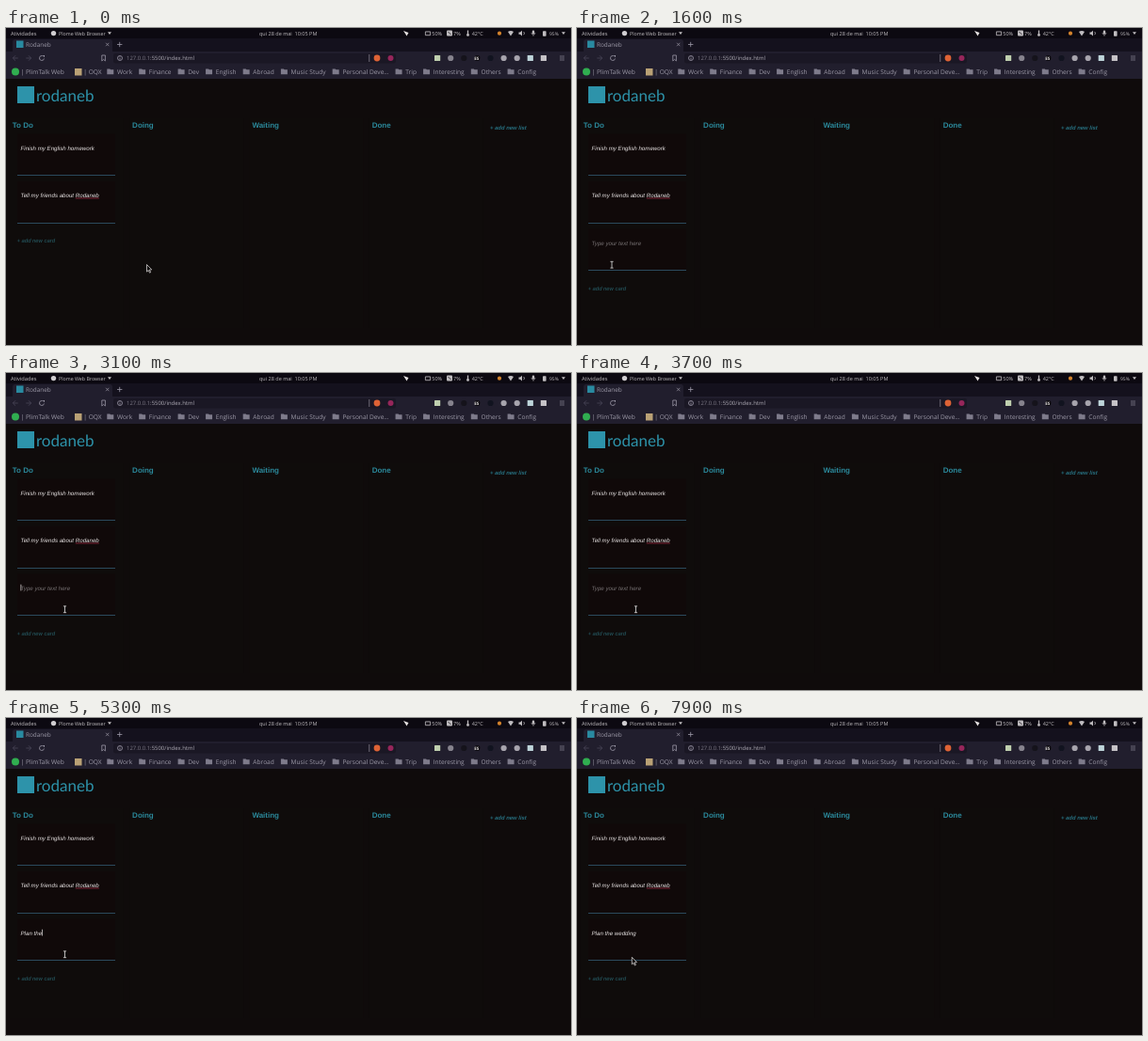
Animation, 600 px wide and 337 px high, one loop 8000 ms. Source, as an HTML page with a canvas:

```html
<!DOCTYPE html>
<html lang="en">
<head>
<meta charset="utf-8">
<title>Task board</title>
<style>
html, body { margin: 0; width: 100%; height: 100%; overflow: hidden; background: #0f0b0b; }
canvas { display: block; width: 600px; height: 337px; }
</style>
</head>
<body>
<canvas id="stage" width="600" height="337"></canvas>
<script>
const LOOP = 8000, TICK = 100, BLINK = 600;
const ADD_CARD = 1400, FOCUS = 3000, LEAVE_CARD = 7800;
const UI = '"Open Sans", "Noto Sans", sans-serif';
const PAGE = '"Liberation Sans", Arial, sans-serif';
const APP = 'Rodaneb';
const TEAL = '#2b899b', WHITE = '#e6e2e2', INK = '#9c99a7', PANEL_INK = '#c0bdc0';

const ctx = document.getElementById('stage').getContext('2d');
ctx.textRendering = 'geometricPrecision';

function rect(x, y, w, h, color, radius = 0) {
  ctx.fillStyle = color;
  ctx.beginPath();
  ctx.roundRect(x, y, w, h, radius);
  ctx.fill();
}

function dot(x, y, r, color) {
  rect(x - r, y - r, 2 * r, 2 * r, color, r);
}

function ring(x, y, r, color, from = 0, to = Math.PI * 2) {
  ctx.strokeStyle = color;
  ctx.lineWidth = 0.8;
  ctx.beginPath();
  ctx.arc(x, y, r, from, to);
  ctx.stroke();
}

// Draws SVG path data with its origin at x, y.
function path(x, y, data, stroke, width = 0.8, fill) {
  const outline = new Path2D(data);
  ctx.save();
  ctx.translate(x, y);
  if (fill) {
    ctx.fillStyle = fill;
    ctx.fill(outline);
  }
  if (stroke) {
    ctx.strokeStyle = stroke;
    ctx.lineWidth = width;
    ctx.stroke(outline);
  }
  ctx.restore();
}

const solid = (x, y, data, color) => path(x, y, data, null, 0, color);

function textWidth(str, size, family = UI, style = '') {
  ctx.font = `${style} ${size}px ${family}`;
  return ctx.measureText(str).width;
}

function label(str, x, y, size, color, family = UI, style = '') {
  const width = textWidth(str, size, family, style);
  ctx.fillStyle = color;
  ctx.fillText(str, x, y);
  return width;
}

const italic = (str, x, y, color, size = 6.17, weight = '') =>
  label(str, x, y, size, color, PAGE, `italic ${weight}`);

function drawPanel() {
  const text = (str, x, size = 5.5) => label(str, x, 7.7, size, PANEL_INK);
  const caretDown = x => solid(x, 4.3, 'M0 0h4l-2 2.7z', PANEL_INK);
  rect(0, 0, 600, 11, '#0c0911');

  text('Atividades', 5, 5.7);
  dot(50.5, 5.6, 2.7, '#d0cdd0');
  text('Plome Web Browser', 56, 5.3);
  caretDown(108);
  text('qui 28 de mai  10:05 PM', 269);

  solid(422, 3, 'M0 0l5.5 2-2 3.5-1.5-2.5z', WHITE);
  rect(445.4, 3.9, 5.2, 3.8, '#17131b', 1);
  path(445.4, 3.9, 'M0 0h5.2v3.8h-5.2z', PANEL_INK);
  text('50%', 452.3);
  rect(468, 2.5, 6, 6, PANEL_INK, 1);
  path(469.5, 4, 'M0 0l3 3', '#17131b');
  text('7%', 475);
  path(490.5, 2.5, 'M0 0v5', PANEL_INK, 1.3);
  dot(490.5, 7.4, 1.4, PANEL_INK);
  text('42°C', 494.7);

  dot(524, 5.7, 2.1, '#d5842c');
  solid(533, 4, 'M0 0q3-2 6 0l-3 4.5z', PANEL_INK);
  solid(544.5, 4.6, 'M0 0h1.5l2-1.8v5.6l-2-1.6h-1.5z', PANEL_INK);
  ring(548.4, 5.6, 2, PANEL_INK, -0.9, 0.9);
  rect(558.8, 2.5, 2.4, 4, PANEL_INK, 1.2);
  path(560, 4, 'M-2 1a2 2 0 0 0 4 0M0 3v1.7', PANEL_INK, 0.6);
  rect(570, 3.2, 3.6, 5.5, PANEL_INK, 0.7);
  text('95%', 577, 5);
  caretDown(590);
}

function drawAddressRow() {
  const dim = '#4b475a';
  path(10, 32, 'M2.7 0h-5.4M0-2.7l-2.7 2.7 2.7 2.7', dim);
  path(24, 32, 'M-2.7 0h5.4M0-2.7l2.7 2.7-2.7 2.7', dim);
  ring(38, 32, 2.5, INK, 0.2, 5.3);
  solid(39, 29, 'M0 0h2v2.3z', INK);
  path(101.8, 29, 'M0 0h3.6v6l-1.8-1.6-1.8 1.6z', INK);

  rect(114, 27, 300, 10.5, '#1a1724', 2);
  ring(121, 32, 2.5, INK);
  path(121, 30.4, 'M0 0v.8M0 1.4v1.8', INK);
  const hostWidth = label('127.0.0.1', 128, 34.1, 5.95, '#7d7986');
  label(':5500/index.html', 128 + hostWidth, 34.1, 5.95, '#b0adb7');
  rect(385.4, 28, 0.8, 8, '#827e8a');
  dot(394, 32, 3.4, '#dd6235');
  dot(408.5, 32, 3, '#96265a');

  const extensions = ['#bfcfae', '#86838d', '#15131b', '#0d0b10', '#11131f',
    '#a7a4ad', '#a7a4ad', '#bdd4d9', '#c6c3c7'];
  extensions.forEach((color, i) => {
    const square = i % 7 < 2 && i !== 1;
    rect(455 + 14.1 * i, 28.9, 6.2, 6.2, color, square ? 0.5 : 3.1);
  });
  label('ES', 497.3, 33.8, 4.6, WHITE, UI, 'bold');
  path(588, 30, 'M0 0h5M0 2h5M0 4h5', INK, 0.6);
}

function drawBookmarks() {
  dot(10, 46.5, 4, '#30ae50');
  label('| PlimTalk Web', 15.7, 48.8, 6.6, INK);
  rect(73, 43, 7.5, 7.5, '#b9a175');
  label('| OQX', 82.3, 48.8, 6.6, INK);

  // Folders sit at an even gap between the first and last positions.
  const names = ['Work', 'Finance', 'Dev', 'English', 'Abroad', 'Music Study',
    'Personal Deve…', 'Trip', 'Interesting', 'Others', 'Config'];
  const first = 118, last = 543.3;
  const widths = names.map(name => textWidth(name, 6.6));
  const used = widths.slice(0, -1).reduce((sum, w) => sum + w, 0);
  const gap = (last - first - used) / (names.length - 1);
  let x = first;
  names.forEach((name, i) => {
    solid(x - 10.7, 43.4, 'M0 0h3l.8.8h3.2v5h-7z', '#7e7b8b');
    label(name, x, 48.8, 6.6, INK);
    x += widths[i] + gap;
  });
}

function drawBrowser() {
  rect(0, 11, 600, 14, '#14111d');
  rect(7, 12, 106, 14, '#211e2d', [3, 3, 0, 0]);
  rect(0, 25, 600, 29, '#211e2d');
  rect(11, 13.5, 7.5, 7.5, '#298aa0');
  label(APP, 21, 19.5, 6.4, INK);
  path(107.7, 17.5, 'M-1.7-1.7l3.4 3.4M-1.7 1.7l3.4-3.4', INK, 0.7);
  path(120.7, 17.5, 'M-2.7 0h5.4M0-2.7v5.4', INK);
  drawAddressRow();
  drawBookmarks();
}

const cardTop = index => 112.5 + 50.5 * index;

function drawCard(index, str, color) {
  const y = cardTop(index);
  rect(12, y, 104, 44.5, '#100909');
  rect(12, Math.floor(y + 44), 104, 1, '#2b4a5d');
  return italic(str, 15.5, y + 17.1, color);
}

function drawBoard(t) {
  rect(0, 54, 600, 283, '#0f0b0b');
  rect(12, 62, 18, 18, '#2d93aa');
  label(APP.toLowerCase(), 32, 78, 17, '#2d93aa', 'Lato, sans-serif');

  ['To Do', 'Doing', 'Waiting', 'Done'].forEach((title, i) => {
    const x = 6.8 + i * 127.3;
    rect(x - 3, 96, 121, 223, '#0f0c0b');
    label(title, x, 106.1, 8, TEAL, PAGE, 'bold');
  });
  italic('+ add new list', 514, 107.6, '#277080', 5.9, 'bold');

  const lead = 'Tell my friends about ';
  drawCard(0, 'Finish my English homework', WHITE);
  drawCard(1, lead + APP, WHITE);
  const leadWidth = ctx.measureText(lead).width;
  rect(15.5 + leadWidth, 180.6, ctx.measureText(APP).width, 0.8, '#9a2b42');

  const added = t >= ADD_CARD;
  if (added) drawNewCard(t);
  const hovered = !added && t >= 1100;
  italic('+ add new card', 11.5, cardTop(added ? 3 : 2) + 14.8, hovered ? '#213a43' : '#28616b', 5.9);
}

// [first key time, last key time, text]
const BURSTS = [[4100, 4300, 'Plan'], [5000, 5300, ' the'], [6200, 6500, ' wed'], [6800, 6900, 'ding']];

function typing(t) {
  let typed = '', lastKey = FOCUS;
  for (const [from, to, text] of BURSTS) {
    if (t < from) break;
    const share = Math.min(1, (t - from + TICK) / (to - from + TICK));
    typed += text.slice(0, Math.ceil(text.length * share));
    lastKey = Math.min(t, to);
  }
  const caret = t >= FOCUS && Math.floor((t - lastKey) / BLINK) % 2 === 0;
  return { typed, caret };
}

function drawNewCard(t) {
  const { typed, caret } = typing(t);
  const width = drawCard(2, typed || 'Type your text here', typed ? WHITE : '#777273');
  if (caret) rect(15.5 + (typed ? width : 0), 224.8, 0.8, 6.8, '#cfcbcb');
}

// [start, end, x, y]: each move eases out from where the last one ended.
const MOVES = [[800, 1200, 53.5, 216], [1300, 1600, 37, 251.7], [2500, 3100, 62.5, 251.3],
  [7700, 7900, 58.3, 254.3]];

function pointerAt(t) {
  let x = 149.5, y = 251.5;
  for (const [from, to, endX, endY] of MOVES) {
    const u = Math.min(1, Math.max(0, (t - from) / (to - from)));
    const eased = 1 - (1 - u) ** 2;
    x += (endX - x) * eased;
    y += (endY - y) * eased;
  }
  return [x, y];
}

function drawPointer(t) {
  const [x, y] = pointerAt(t);
  if (t >= ADD_CARD && t < LEAVE_CARD) {
    const beam = 'M-1.6-3.4h3.2M0-3.4v6.8M-1.6 3.4h3.2';
    path(x, y, beam, '#080606', 2);
    path(x, y, beam, '#d2cfcf', 0.9);
  } else {
    path(x, y, 'M0 0v7.6l1.8-1.6 1.2 2.7 1.1-.5-1.2-2.6 2.3-.2z', '#d5d2d2', 0.8, '#090707');
  }
}

const start = performance.now();

function frame() {
  const elapsed = (performance.now() - start) % LOOP;
  const t = Math.floor(elapsed / TICK) * TICK;
  drawBoard(t);
  drawPanel();
  drawBrowser();
  drawPointer(t);
  requestAnimationFrame(frame);
}

frame();
</script>
</body>
</html>
```
